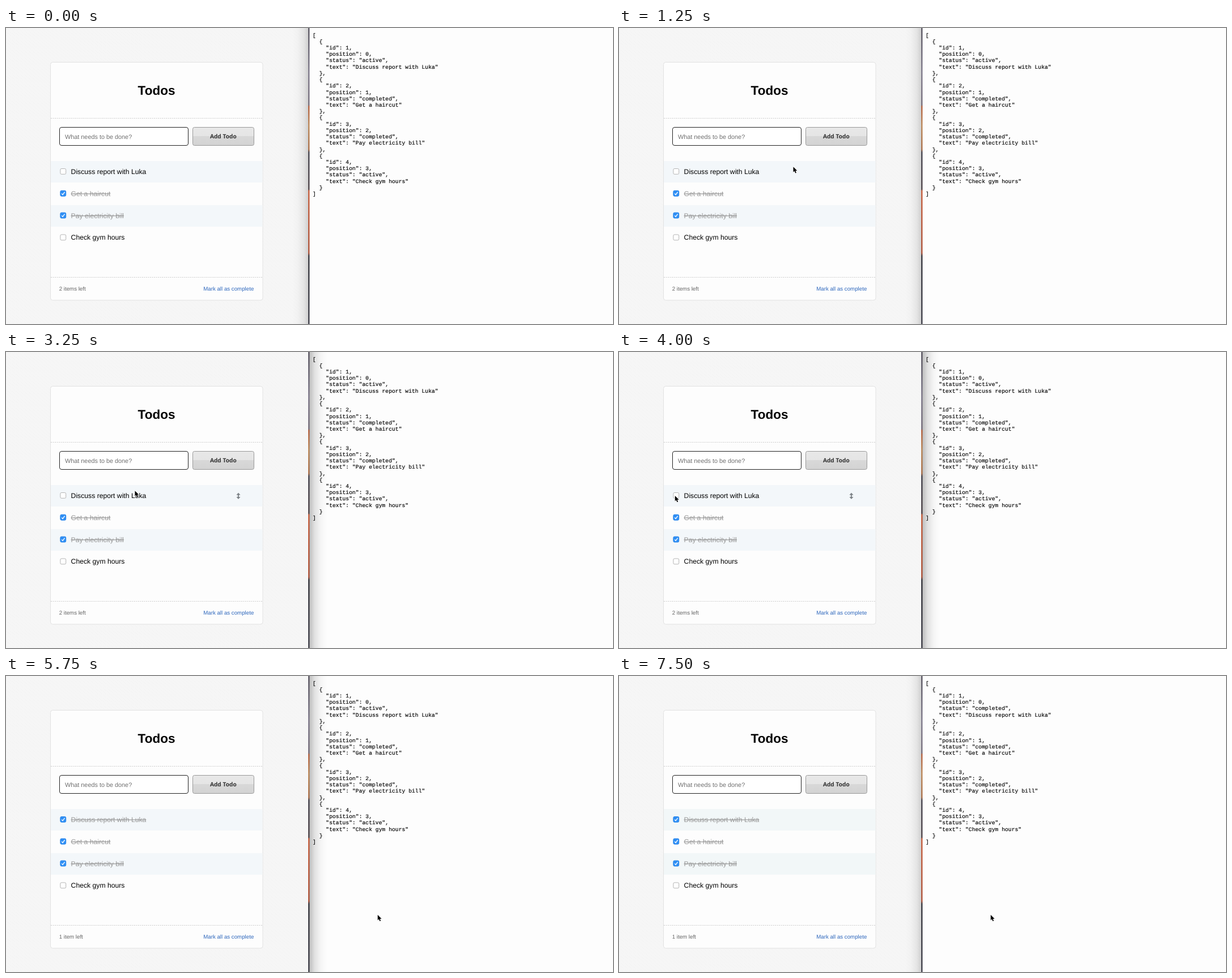
Write an HTML page that moves like this. It is 1071 px wide and 523 px high and loops after 8 s.

```html
<!DOCTYPE html>
<html lang="en">
<head>
<meta charset="utf-8">
<title>Todos</title>
<style>
  html, body { margin: 0; width: 100%; height: 100%; overflow: hidden; background: #fdfdfd; }
  svg { display: block; width: 1071px; height: 523px; }
  text { font-family: "Liberation Sans", Arial, sans-serif; text-rendering: geometricPrecision; }
  .title { font-size: 22.5px; font-weight: 700; text-anchor: middle; }
  .hint { font-size: 10.85px; fill: #6f6f6f; }
  .button { font: 700 10.2px "Open Sans", sans-serif; fill: #333; text-anchor: middle; }
  .item { font-size: 12.2px; }
  .foot { font-size: 9.72px; fill: #666; }
  .link { fill: #2f68bd; text-anchor: end; }
  .json text { font: 9.72px "Liberation Mono", "Courier New", monospace; stroke: #000; stroke-width: .15px; }
  .done .item { fill: #999; text-decoration: line-through; }
  .box { fill: #fff; stroke: #b4b4b4; }
  .tick { fill: none; stroke: none; stroke-width: 1.3; }
  .done .box { fill: #2f8ff5; stroke: #2885ea; }
  .done .tick { stroke: #fff; }
  .dash { stroke: #ccc; stroke-dasharray: 2 1.5; }
</style>
</head>
<body>
<svg viewBox="0 0 1071 523">
  <defs>
    <pattern id="paper" width="7" height="6" patternUnits="userSpaceOnUse">
      <path fill="#f6f6f6" d="M0 0h7v6H0z"/>
      <path stroke="#f3f3f3" d="M0 1.5h2M3 3.5h2M5 5.5h2"/>
    </pattern>
    <linearGradient id="gloss" x2="0" y2="1">
      <stop offset="0" stop-color="#e8e8e8"/>
      <stop offset=".49" stop-color="#e5e5e5"/>
      <stop offset=".5" stop-color="#d8d8d8"/>
      <stop offset="1" stop-color="#d3d3d3"/>
    </linearGradient>
    <linearGradient id="shade">
      <stop offset="0" stop-opacity="0"/>
      <stop offset=".35" stop-opacity=".03"/>
      <stop offset=".7" stop-opacity=".11"/>
      <stop offset="1" stop-opacity=".26"/>
    </linearGradient>
    <linearGradient id="desk" x2="0" y2="1">
      <stop offset="0" stop-color="#3d3946"/>
      <stop offset=".15" stop-color="#6a6478"/>
      <stop offset=".26" stop-color="#5e5565"/>
      <stop offset=".265" stop-color="#a8441c"/>
      <stop offset=".33" stop-color="#b0743c"/>
      <stop offset=".41" stop-color="#9c5527"/>
      <stop offset=".42" stop-color="#262430"/>
      <stop offset=".545" stop-color="#30242a"/>
      <stop offset=".55" stop-color="#bd421b"/>
      <stop offset=".76" stop-color="#a03416"/>
      <stop offset=".77" stop-color="#15151d"/>
      <stop offset="1" stop-color="#20202c"/>
    </linearGradient>
  </defs>

  <path fill="url(#paper)" d="M0 0h534v523H0z"/>
  <rect x="78.5" y="60.5" width="374.5" height="420.5" rx="4" fill="#fdfdfd" stroke="#e2e2e2"/>
  <text class="title" x="265.5" y="118">Todos</text>
  <path class="dash" d="M79 159.5h374M79 440.5h374"/>
  <rect x="94.5" y="175.5" width="227" height="32" rx="3.5" fill="#fff" stroke="#222"/>
  <text class="hint" x="104" y="195.7">What needs to be done?</text>
  <rect x="329.5" y="175.5" width="108" height="32" rx="3" fill="url(#gloss)" stroke="#999"/>
  <text class="button" x="383.3" y="195.2">Add Todo</text>
  <path id="stripes" d="M79 235h373.5v38H79zM79 313h373.5v38H79z"/>
  <g id="list"></g>
  <path id="handle" fill="#7d8287" d="M410 248.8l3.6 4h-2.7v3.2h2.7l-3.6 4-3.6-4h2.7v-3.2h-2.7z"/>
  <text class="foot" id="count" x="93.7" y="464"></text>
  <text class="foot link" x="437.3" y="464">Mark all as complete</text>

  <path fill="#fdfdfd" d="M535 0h536v523H535z"/>
  <path id="shadeLeft" fill="url(#shade)" opacity=".6" d="M505 0h28.5v523H505z"/>
  <path id="shadeRight" fill="url(#shade)" transform="matrix(-1 0 0 1 1068 0)" d="M501 0h32v523h-32z"/>
  <path fill="url(#desk)" d="M533.4 0h2v523h-2z"/>
  <g class="json" id="json"></g>

  <path id="cursor" fill="#000" stroke="#fff" stroke-width="1.4" stroke-linejoin="round" paint-order="stroke"
        d="M0 0v9.4l2.1-1.9 1.6 3.7 1.7-.8-1.5-3.5h3z"/>
</svg>
<script>
const LOOP = 8000;
const CHECKED = 5000, SAVED = 7500;
const todos = [
  ["Discuss report with Luka", false],
  ["Get a haircut", true],
  ["Pay electricity bill", true],
  ["Check gym hours", false]
];
// time, x, y of the pointer tip
const pointer = [
  [750, 573, -4], [1000, 336.5, 203], [1250, 307.5, 245.3],
  [3250, 227.5, 245.3], [3500, 209.5, 246], [3750, 115.5, 254],
  [4000, 98.8, 254], [5500, 392.5, 273], [5750, 655.8, 422]
];
const $ = id => document.getElementById(id);
const within = (t, from, to) => t >= from && t < to;
const show = (id, on) => $(id).setAttribute("visibility", on ? "visible" : "hidden");

$("list").innerHTML = todos.map(([text, done], i) => `
  <g class="${done ? "done" : ""}" transform="translate(0 ${253.5 + i * 38.85})">
    <rect class="box" x="95.9" y="-5" width="9.8" height="9.8" rx="2"/>
    <path class="tick" d="M98.2 .2l1.9 2.1 3.5-4.9"/>
    <text class="item" x="114.6" y="4.3">${text}</text>
  </g>`).join("");

const lines = ["["];
todos.forEach(([text, done], i) => lines.push(
  "  {",
  `    "id": ${i + 1},`,
  `    "position": ${i},`,
  `    "status": "${done ? "completed" : "active"}",`,
  `    "text": "${text}"`,
  i < todos.length - 1 ? "  }," : "  }"
));
lines.push("]");
$("json").innerHTML = lines.map((line, i) => {
  const body = line.trimStart();
  const x = 541 + (line.length - body.length) * 5.84;
  return `<text x="${x}" y="${15.6 + i * 11.22}">${body}</text>`;
}).join("");

const firstItem = $("list").firstElementChild;
const firstStatus = $("json").children[4];

function draw(t) {
  const checked = t >= CHECKED;
  const leftActive = within(t, 2000, 6500);
  const spot = pointer.filter(p => p[0] <= t).pop();
  show("cursor", spot);
  if (spot) $("cursor").setAttribute("transform", `translate(${spot[1]} ${spot[2]})`);
  show("handle", within(t, 3250, 5750));
  show("shadeLeft", !leftActive);
  show("shadeRight", leftActive);
  firstItem.classList.toggle("done", checked);
  $("count").textContent = checked ? "1 item left" : "2 items left";
  firstStatus.textContent = `"status": "${t >= SAVED ? "completed" : "active"}",`;
  $("stripes").setAttribute("fill", t >= SAVED ? "#f2f7f8" : "#f3f7fa");
}

const start = performance.now();
function tick(now) {
  draw(Math.max(0, now - start) % LOOP);
  requestAnimationFrame(tick);
}
draw(0);
requestAnimationFrame(tick);
</script>
</body>
</html>
```
